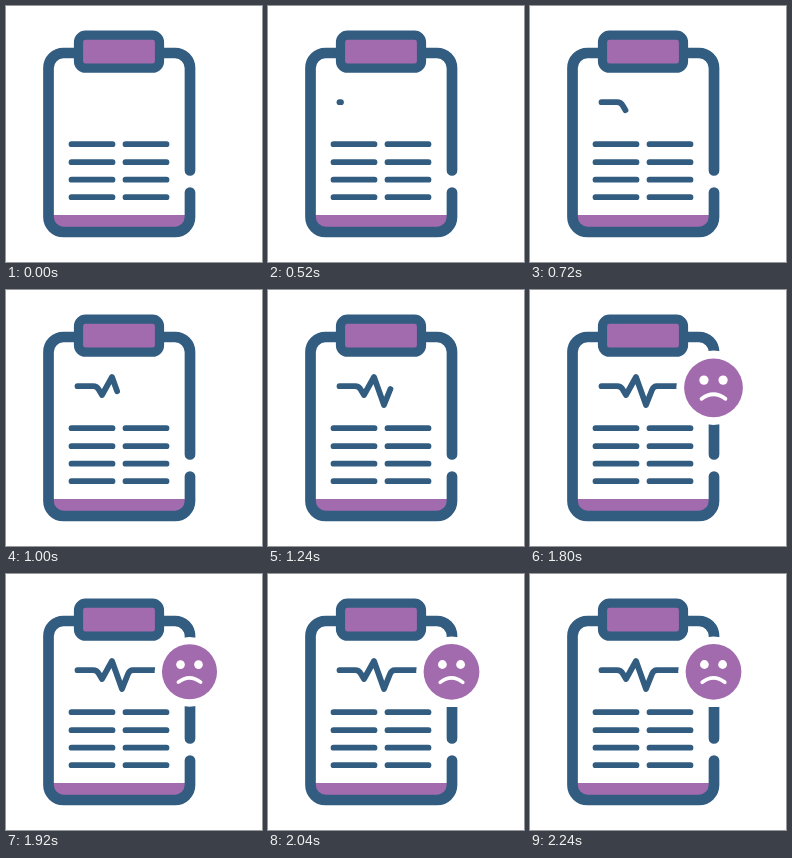
An HTML page for the animation above (5000 ms loop, 256x256 px).

```html
<!DOCTYPE html>
<html lang="en">
<head>
<meta charset="utf-8">
<title>Clipboard with pulse line and sad face</title>
<style>
  html, body { margin: 0; height: 100%; overflow: hidden; background: #fff; }
  svg { display: block; width: 100%; height: 100%; }
  .line { fill: none; stroke: #325c80; stroke-linecap: round; stroke-linejoin: round; }
  .thin { stroke-width: 5.8; }
  .purple { fill: #a26bae; }
  .white { fill: #fff; }
</style>
</head>
<body>
<svg viewBox="0 0 256 256">
  <rect class="purple" x="44" y="209" width="138" height="15"/>
  <path class="line" stroke-width="10.7" d="M184 186.5V211a15 15 0 0 1-15 15H57.5a15 15 0 0 1-15-15V62a15 15 0 0 1 15-15H169a15 15 0 0 1 15 15V164.5"/>
  <rect class="purple" x="72.5" y="29.2" width="81" height="33" rx="7"/>
  <rect class="line" stroke-width="9.2" x="72.5" y="29.2" width="81" height="33" rx="7"/>
  <path class="line thin" d="M65.5 138.2h41m13 0h41M65.5 156.2h41m13 0h41M65.5 173.7h41m13 0h41M65.5 191.2h41m13 0h41"/>
  <path id="pulse" class="line thin" pathLength="100" d="M71.5 96.2H87Q91 96.2 93 100L96 105 106 87 116 115 122 100Q123.5 96.2 127 96.2H154"/>
  <g id="face">
    <circle class="white" r="35.3"/>
    <circle class="purple" r="27.9"/>
    <circle class="white" cx="-9.1" cy="-7.3" r="4.4"/>
    <circle class="white" cx="9.1" cy="-7.3" r="4.4"/>
    <path d="M-11.3 10.5Q0 1.8 11.3 10.5" fill="none" stroke="#fff" stroke-width="3.6" stroke-linecap="round"/>
  </g>
</svg>
<script>
  const LOOP = 5000, DRAW_START = 510, DRAW_TIME = 980, POP_START = 1587;
  const pulse = document.getElementById('pulse');
  const face = document.getElementById('face');
  const show = (el, on) => el.setAttribute('visibility', on ? 'visible' : 'hidden');

  // Damped spring that settles at 1
  const spring = ms => 1 - Math.exp(-0.0128 * ms) * Math.cos(0.0175 * ms);

  function render(now) {
    const t = now % LOOP;
    const drawn = Math.min(1, Math.max(0, (t - DRAW_START) / DRAW_TIME));
    show(pulse, drawn > 0);
    pulse.setAttribute('stroke-dasharray', drawn < 1 ? `${drawn * 100} 200` : 'none');

    const age = t - POP_START;
    show(face, age > 0);
    face.setAttribute('transform', `translate(183.5 97.8) scale(${age > 0 ? spring(age) : 0})`);
  }

  const start = performance.now();
  function tick() {
    render(performance.now() - start);
    requestAnimationFrame(tick);
  }
  tick();
</script>
</body>
</html>
```
